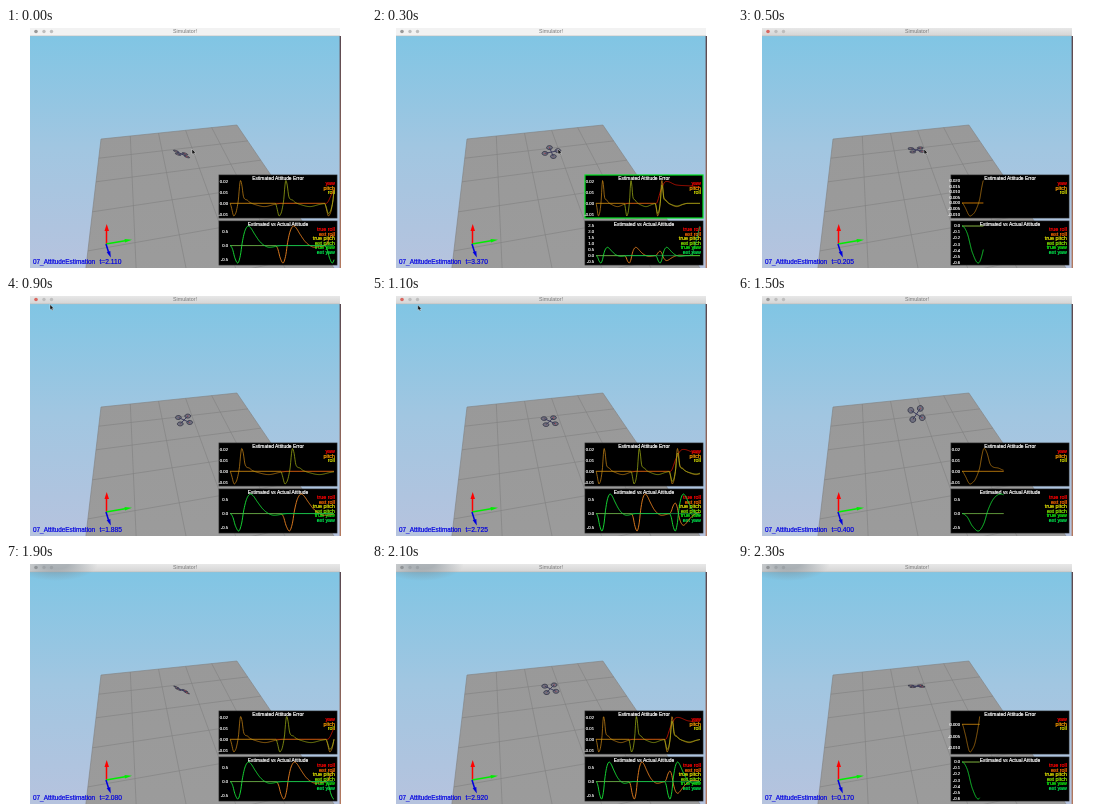
These frames come from a looping animation (360x240 px, 2.4 s). An HTML page:

```html
<!DOCTYPE html>
<html lang="en">
<head>
<meta charset="utf-8">
<title>Simulator</title>
<style>
html, body { margin: 0; width: 100%; height: 100%; overflow: hidden; background: #fff; }
svg { display: block; width: 100vw; height: 100vh; }
text { font-family: "Liberation Sans", Arial, sans-serif; white-space: pre; }
.name { font-size: 4.9px; stroke-width: .2; }
.key { font-size: 5.4px; stroke-width: .2; text-anchor: end; }
.tick { font-size: 4.2px; fill: #fff; stroke: #fff; stroke-width: .15; text-anchor: end; }
.status { fill: #0000e0; stroke: #0000e0; stroke-width: .2; }
.curve { fill: none; stroke-linejoin: round; }
</style>
</head>
<body>
<svg id="stage" viewBox="0 0 360 240">
  <defs>
    <linearGradient id="sky" x1="0" y1="0" x2="0" y2="1">
      <stop offset="0" stop-color="#7ec5e4"/>
      <stop offset=".5" stop-color="#a1c6e1"/>
      <stop offset="1" stop-color="#b6c3de"/>
    </linearGradient>
    <linearGradient id="bar" x1="0" y1="0" x2="0" y2="1">
      <stop offset="0" stop-color="#e8e8e8"/>
      <stop offset="1" stop-color="#d4d4d4"/>
    </linearGradient>
    <linearGradient id="ground" x1="0" y1="0" x2="0" y2="1">
      <stop offset="0" stop-color="#999"/>
      <stop offset="1" stop-color="#a2a2a2"/>
    </linearGradient>
    <linearGradient id="trim" x1="0" y1="0" x2="0" y2="1">
      <stop offset="0" stop-color="#5a4850"/>
      <stop offset="1" stop-color="#b47a60"/>
    </linearGradient>
    <radialGradient id="haze">
      <stop offset=".3" stop-color="#7f8a92" stop-opacity=".55"/>
      <stop offset="1" stop-color="#7f8a92" stop-opacity="0"/>
    </radialGradient>
    <clipPath id="window"><rect x="24" width="310" height="240"/></clipPath>
  </defs>
  <rect width="360" height="240" fill="#fff"/>
  <g clip-path="url(#window)">
    <rect x="24" width="310" height="240" fill="url(#sky)"/>
    <path id="floor" fill="url(#ground)"/>
    <path id="grid" fill="none" stroke="#808080" stroke-width=".6"/>
    <g id="drone"></g>
    <g fill="none" stroke-width="1.5">
      <path d="M100.500 216V202" stroke="#f00"/>
      <path d="M100 216L119 212.800" stroke="#0e0"/>
      <path d="M100 216L102.500 224" stroke="#00d"/>
    </g>
    <path d="M100.700 196L103 203H98.500Z" fill="#f00"/>
    <path d="M126 211.800L119 214.600L118.500 211Z" fill="#0e0"/>
    <path d="M104.800 229.500L100.700 224.300L104.300 223Z" fill="#00d"/>
    <text class="status" x="27" y="236" font-size="6.4">07_AttitudeEstimation</text>
    <text class="status" id="clock" x="93.500" y="236" font-size="6.7"></text>
    <g id="panels"></g>
    <rect id="titlebar" x="24" width="310" height="8"/>
    <path d="M24 7.800H334" stroke="#b8b8b8" stroke-width=".5"/>
    <circle id="close" cx="30" cy="3.500" r="1.800"/>
    <circle cx="38" cy="3.500" r="1.700" fill="#bdbdbd"/>
    <circle cx="45.500" cy="3.500" r="1.700" fill="#bdbdbd"/>
    <text x="179" y="5.400" font-size="5.3" fill="#777" text-anchor="middle">Simulator!</text>
    <ellipse id="shade" cx="50" cy="0" rx="42" ry="17" fill="url(#haze)"/>
  </g>
  <rect x="333.600" y="8" width="1.400" height="232" fill="url(#trim)"/>
  <path id="cursor" d="M0 0V5.200L1.200 4.200L2.100 6L3 5.600L2.200 3.900H3.800Z" fill="#111" stroke="#fff" stroke-width=".35"/>
</svg>
<script>
const $ = id => document.getElementById(id);
const STEP = 100, FRAMES = 24;

function add(parent, tag, attrs = {}, text = "") {
  const el = document.createElementNS("http://www.w3.org/2000/svg", tag);
  for (const k in attrs) el.setAttribute(k, attrs[k]);
  el.textContent = text;
  parent.append(el);
  return el;
}

// Smooth curve through [x, y] points, constant beyond both ends
function spline(pts) {
  const slope = i => {
    const a = pts[i - 1], b = pts[i + 1];
    return a && b ? (b[1] - a[1]) / (b[0] - a[0]) : 0;
  };
  return x => {
    if (x <= pts[0][0]) return pts[0][1];
    const i = pts.findIndex(p => p[0] > x);
    if (i < 0) return pts[pts.length - 1][1];
    const [x0, y0] = pts[i - 1], [x1, y1] = pts[i];
    const h = x1 - x0, u = (x - x0) / h, v = 1 - u;
    return v * v * (1 + 2 * u) * y0 + u * u * (3 - 2 * u) * y1
      + h * u * v * (v * slope(i - 1) - u * slope(i));
  };
}

// Ground plane in perspective
function ground(u, v) {
  const w = 1 + .02 * u - .095 * v;
  return [(95 + 31.8 * u - 11.06 * v) / w, (111 - .86 * u + 6.8 * v) / w]
    .map(n => n.toFixed(1)).join(" ");
}
const ROWS = 8, COLS = 5;
$("floor").setAttribute("d", `M${ground(0, 0)}L${ground(COLS, 0)}L${ground(COLS, ROWS)}L${ground(0, ROWS)}Z`);
let lines = "";
for (let u = 0; u <= COLS; u++) lines += `M${ground(u, 0)}L${ground(u, ROWS)}`;
for (let v = 0; v <= ROWS; v++) lines += `M${ground(0, v)}L${ground(COLS, v)}`;
$("grid").setAttribute("d", lines);

// Flight: a swing in pitch, then roll, then both with yaw
const swing = spline([[0, 0], [.05, -.12], [.1, -.44], [.16, -.61], [.21, -.35], [.25, .12],
  [.3, .5], [.36, .68], [.42, .62], [.5, .4], [.6, .15], [.7, 0], [.8, -.06], [1.05, 0]]);
const miss = spline([[0, 0], [.03, -.004], [.07, -.0113], [.1, -.0105], [.13, -.007], [.17, .0033],
  [.19, .014], [.21, .021], [.24, .017], [.27, .007], [.3, .004], [.35, .003], [.4, .001],
  [.5, -.001], [.7, -.003], [.9, -.001], [1.05, 0]]);
const ROLL = .92, BOTH = 1.92;
const pitch = t => swing(t) + swing(t - BOTH);
const roll = t => swing(t - ROLL) - .6 * swing(t - BOTH);
const yaw = spline([[3, 0], [3.15, .4], [3.5, 3.1]]);
const pitchMiss = t => miss(t) + miss(t - BOTH);
const rollMiss = t => miss(t - ROLL) + .8 * miss(t - BOTH);
const yawMiss = spline([[1.95, 0], [2.1, .012], [2.25, .02], [2.6, .017], [3.1, .016], [4, .013]]);

const LEFT = 224, WIDTH = 104;

function panel(top, height, title, names, series, y0, y1) {
  const g = add($("panels"), "g");
  const box = add(g, "rect", { x: 213, y: top, width: 118, height, fill: "#000", stroke: "#222", "stroke-width": .7 });
  add(g, "text", { class: "name", x: 272, y: top + 5.2, fill: "#fff", stroke: "#fff", "text-anchor": "middle" }, title);
  names.forEach(([name, color], i) => add(g, "text",
    { class: "key", x: 329, y: top + 10.4 + i * 4.5, fill: color, stroke: color }, name));
  const ticks = add(g, "g");
  const curves = series.map(([, color, width]) =>
    add(g, "path", { class: "curve", stroke: color, "stroke-width": width }));

  function draw(t) {
    const n = 240;
    const data = series.map(([f]) => Array.from({ length: n + 1 }, (_, i) => f(t * i / n)));
    const all = data.flat();
    const lo = Math.min(...all), hi = Math.max(...all), range = hi - lo;
    const y = v => y1 - (v - lo) / range * (y1 - y0);
    const scale = WIDTH * t / Math.max(1, t) / n;
    data.forEach((vals, k) => curves[k].setAttribute("d",
      "M" + vals.map((v, i) => `${(LEFT + i * scale).toFixed(2)} ${y(v).toFixed(2)}`).join("L")));
    drawTicks(lo, hi, y);
  }

  function drawTicks(lo, hi, y) {
    const range = hi - lo;
    const base = 10 ** Math.floor(Math.log10(range / 6.4));
    const step = base * [1, 2, 5, 10].find(m => range / (base * m) <= 6.4);
    const digits = Math.max(0, -Math.floor(Math.log10(step) + 1e-6));
    ticks.replaceChildren();
    for (let i = Math.ceil((lo - range * .02) / step); i * step <= hi + range * .05; i++)
      add(ticks, "text", { class: "tick", x: 222, y: y(i * step) + 1.4 }, (i * step).toFixed(digits));
  }
  return { box, draw };
}

const errors = panel(147, 43, "Estimated Attitude Error",
  [["yaw", "#f00"], ["pitch", "#ffa000"], ["roll", "#d8e000"]],
  [[yawMiss, "#f01800", .7], [pitchMiss, "#d08a18", .7], [rollMiss, "#a8b818", .7]], 152.5, 188);
const angles = panel(193, 44, "Estimated vs Actual Attitude",
  [["true roll", "#f00"], ["est roll", "#ff6a00"], ["true pitch", "#e8e800"],
   ["est pitch", "#90f000"], ["true yaw", "#10f010"], ["est yaw", "#00e850"]],
  [[roll, "#ee8422", .9], [pitch, "#18e838", .9], [yaw, "#20c860", .7]], 198, 235);

// Quadcopter
const arms = [[-1, 1], [1, 1], [-1, -1], [1, -1]];
const rotors = arms.map(() => add($("drone"), "path",
  { fill: "#62647a", "fill-opacity": .75, stroke: "#303040", "stroke-width": .8 }));
const beams = add($("drone"), "path", { stroke: "#3c3c5c", "stroke-width": 1 });
const hubs = arms.map((_, i) => add($("drone"), "circle", { r: .6, fill: i % 2 ? "#b04a50" : "#8a6468" }));
const heroX = spline([[0, 178.5], [1.9, 178], [2.1, 175.5], [2.5, 177], [3.5, 179.5]]);
const heroY = spline([[0, 122], [.2, 122], [.4, 118], [1, 122], [1.885, 124], [2.1, 126], [3.5, 124]]);

function drawDrone(t) {
  const cx = heroX(t), cy = heroY(t);
  const e = .75 + pitch(t), r = 1.1 * roll(t), a = .2 + yaw(t);
  const place = (x, y) => {
    const bx = x * Math.cos(a) - y * Math.sin(a), by = x * Math.sin(a) + y * Math.cos(a);
    return [cx + bx * Math.cos(r), cy - by * Math.sin(e) + bx * Math.sin(r) * Math.cos(e)];
  };
  const pos = arms.map(([x, y]) => place(x * 4.8, y * 4.8));
  arms.forEach(([x, y], i) => {
    const ring = Array.from({ length: 16 }, (_, k) => {
      const q = k * Math.PI / 8;
      return place(x * 4.8 + 2.9 * Math.cos(q), y * 4.8 + 2.9 * Math.sin(q)).join(" ");
    });
    rotors[i].setAttribute("d", `M${ring.join("L")}Z`);
    hubs[i].setAttribute("cx", pos[i][0]);
    hubs[i].setAttribute("cy", pos[i][1]);
  });
  beams.setAttribute("d", `M${pos[0]}L${pos[3]}M${pos[1]}L${pos[2]}`);
}

// Simulated seconds; the run restarts three times per loop
function simTime(i) {
  const [start, t] = i < 5 ? [0, 2.11] : i < 15 ? [5, .205] : i < 23 ? [15, .4] : [23, .17];
  return t + .42 * (i - start);
}

const mouseX = spline([[5, 186], [8, 44], [9, 44], [13, 47]]);
const mouseY = spline([[5, 121], [8, 8.5], [9, 8.5], [13, 9.5]]);

function render(i) {
  const t = simTime(i);
  $("clock").textContent = "t=" + t.toFixed(3);
  drawDrone(t);
  errors.draw(t);
  angles.draw(t);
  errors.box.setAttribute("stroke", t > 3 ? "#00e020" : "#222");
  errors.box.setAttribute("stroke-width", t > 3 ? 1.2 : .7);
  $("titlebar").setAttribute("fill", i < 5 ? "#f2f2f2" : "url(#bar)");
  $("close").setAttribute("fill", i >= 5 && i < 15 ? "#d9665f" : "#999");
  $("shade").style.display = i >= 16 ? "" : "none";
  $("cursor").style.display = i < 14 ? "" : "none";
  $("cursor").setAttribute("transform", `translate(${mouseX(i)} ${mouseY(i)})`);
}

let shown = -1;
const begin = performance.now();
function loop() {
  const i = Math.floor((performance.now() - begin) / STEP) % FRAMES;
  if (i !== shown) render(shown = i);
  requestAnimationFrame(loop);
}
loop();
</script>
</body>
</html>
```
